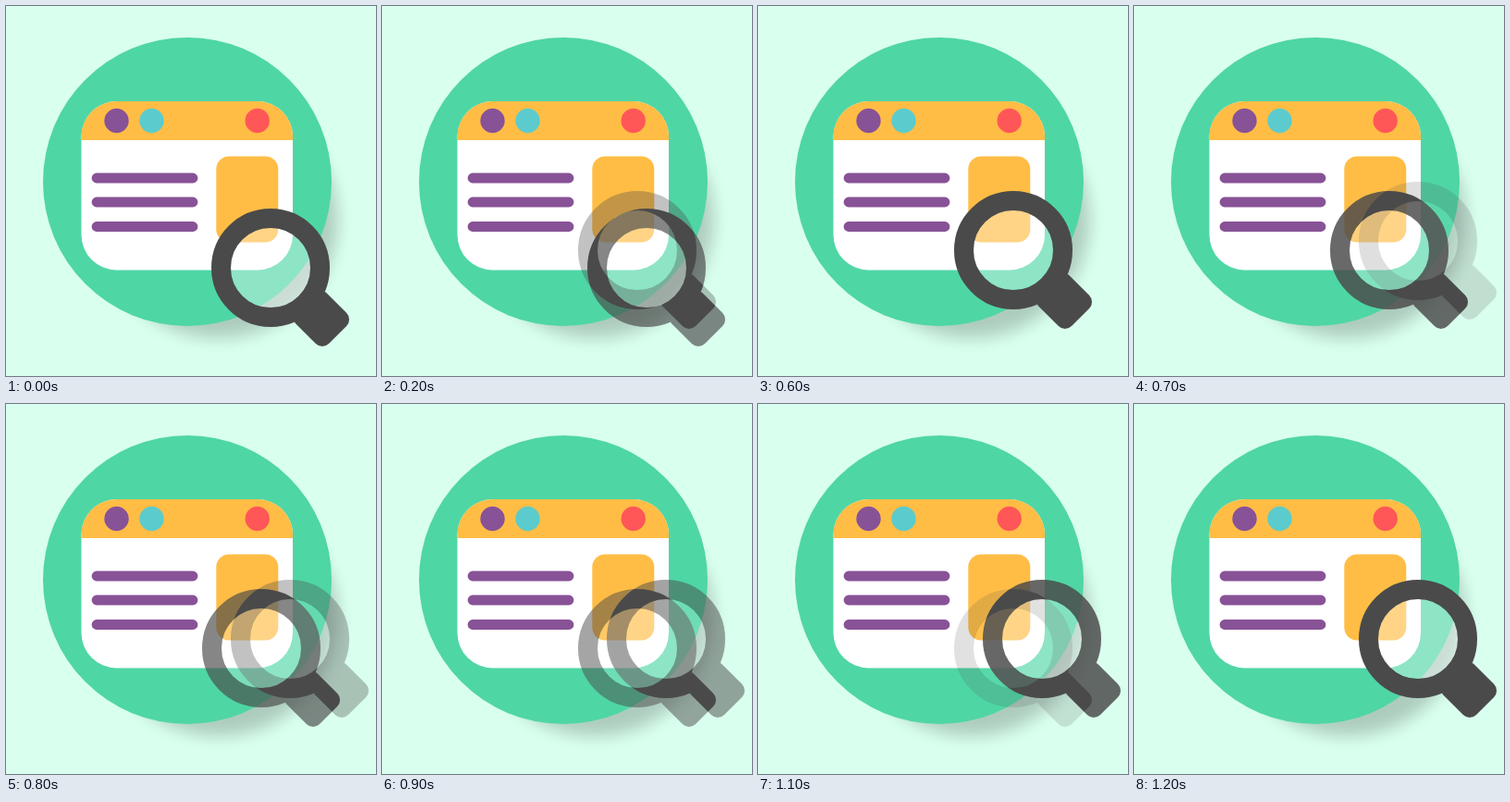
An HTML page that plays this animation: 400x400 px, repeating every 1300 ms.

```html
<!DOCTYPE html>
<html lang="en">
<head>
<meta charset="utf-8">
<title>Search window</title>
<style>
  html, body { margin: 0; width: 100%; height: 100%; overflow: hidden; background: #d9ffee; }
  svg { display: block; width: 100%; height: 100%; }
</style>
</head>
<body>
<svg viewBox="0 0 400 400">
  <defs>
    <filter id="blur" x="-30%" y="-30%" width="160%" height="160%">
      <feGaussianBlur stdDeviation="9"/>
    </filter>
    <clipPath id="frame"><rect x="81.5" y="103" width="228.5" height="182.5" rx="38"/></clipPath>

    <g id="scene">
      <rect width="400" height="400" fill="#d9ffee"/>
      <circle cx="230" cy="231" r="128" fill="#000" opacity=".2" filter="url(#blur)"/>
      <circle cx="196" cy="190" r="156" fill="#4fd6a5"/>
      <g clip-path="url(#frame)">
        <rect x="80" y="100" width="232" height="188" fill="#fff"/>
        <rect x="80" y="100" width="232" height="45" fill="#ffbd45"/>
      </g>
      <circle cx="119.5" cy="124" r="13.2" fill="#885297"/>
      <circle cx="157.5" cy="124" r="13.2" fill="#5bcbcd"/>
      <circle cx="271.7" cy="124" r="13.2" fill="#ff5757"/>
      <path d="M98 186H202M98 212H202M98 238.5H202" stroke="#885297" stroke-width="10.8" stroke-linecap="round"/>
      <rect x="227.3" y="162.5" width="67" height="93" rx="14" fill="#ffbd45"/>
    </g>

    <g id="glass">
      <circle r="44" fill="#fff" opacity=".35"/>
      <g fill="#4a4a4a" transform="rotate(45)">
        <path d="M61-23.5H92.6a10 10 0 0 1 10 10V13.5a10 10 0 0 1-10 10H61L55 20V-20Z"/>
      </g>
      <circle r="53.5" fill="none" stroke="#4a4a4a" stroke-width="21"/>
    </g>
  </defs>

  <g><use href="#scene"/><use id="from" href="#glass"/></g>
  <g id="next"><use href="#scene"/><use id="to" href="#glass"/></g>
</svg>
<script>
  const LOOP = 1300, STEP = 100, FADE_STEPS = 6;
  const stops = [[286, 283], [276, 264], [307, 254]];
  const [from, to, next] = ['from', 'to', 'next'].map(id => document.getElementById(id));

  const place = (el, [x, y]) => el.setAttribute('transform', `translate(${x} ${y})`);

  // Two stepped cross-dissolves, then a hard cut back to the first stop.
  function draw(now) {
    const step = Math.floor((now % LOOP) / STEP);
    const leg = step > FADE_STEPS ? 1 : 0;
    place(from, stops[leg]);
    place(to, stops[leg + 1]);
    next.setAttribute('opacity', (step - leg * FADE_STEPS) / FADE_STEPS);
  }

  const start = performance.now();
  function tick() {
    draw(performance.now() - start);
    requestAnimationFrame(tick);
  }
  tick();
</script>
</body>
</html>
```
